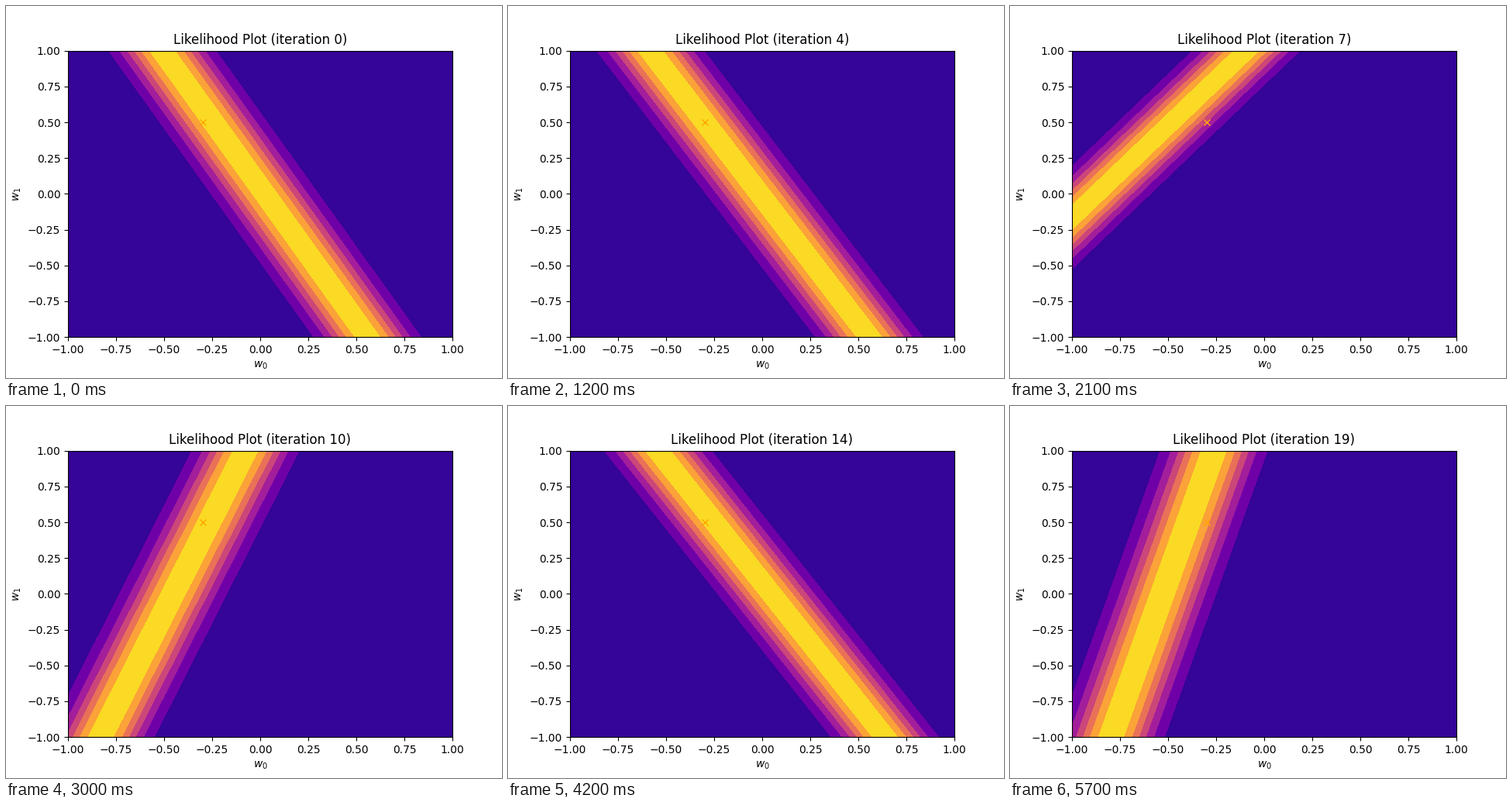
Animation, 640 px wide and 480 px high, one loop 6 s. Source, as a matplotlib script:

```python
import numpy as np
import matplotlib.pyplot as plt
from matplotlib.animation import FuncAnimation

TRUE_W = (-0.3, 0.5)
SIGMA = 0.1428
LEVELS = np.arange(8) * 0.15

# One observed sample (x, t) per iteration
SAMPLES = [
    (0.534, 0.024), (0.700, 0.184), (-0.0835, 0.0785), (0.645, -0.092),
    (0.570, -0.013), (-0.2765, -0.5215), (0.850, 0.120), (-0.7785, -0.8715),
    (0.540, -0.0965), (0.485, -0.049), (-0.377, -0.453), (-0.350, -0.500),
    (-0.550, -0.600), (0.100, -0.250), (0.591, 0.048), (-0.850, -0.800),
    (-0.910, -0.668), (-0.300, -0.420), (-0.100, -0.320), (-0.2675, -0.5295),
]

grid = np.linspace(-1, 1, 100)
W0, W1 = np.meshgrid(grid, grid)

fig, ax = plt.subplots(figsize=(6.4, 4.8), dpi=100)


def likelihood(x, t):
    residual = t - (W0 + W1 * x)
    return np.exp(-residual**2 / (2 * SIGMA**2))


def draw(i):
    ax.clear()
    ax.contourf(W0, W1, likelihood(*SAMPLES[i]), levels=LEVELS, cmap="plasma")
    ax.plot(*TRUE_W, marker="x", color="orange", linestyle="none")
    ax.set(xlim=(-1, 1), ylim=(-1, 1), xlabel="$w_0$", ylabel="$w_1$",
           title=f"Likelihood Plot (iteration {i})")


anim = FuncAnimation(fig, draw, frames=len(SAMPLES), init_func=lambda: draw(0),
                     interval=300, repeat=True, repeat_delay=0)
plt.show()
```
